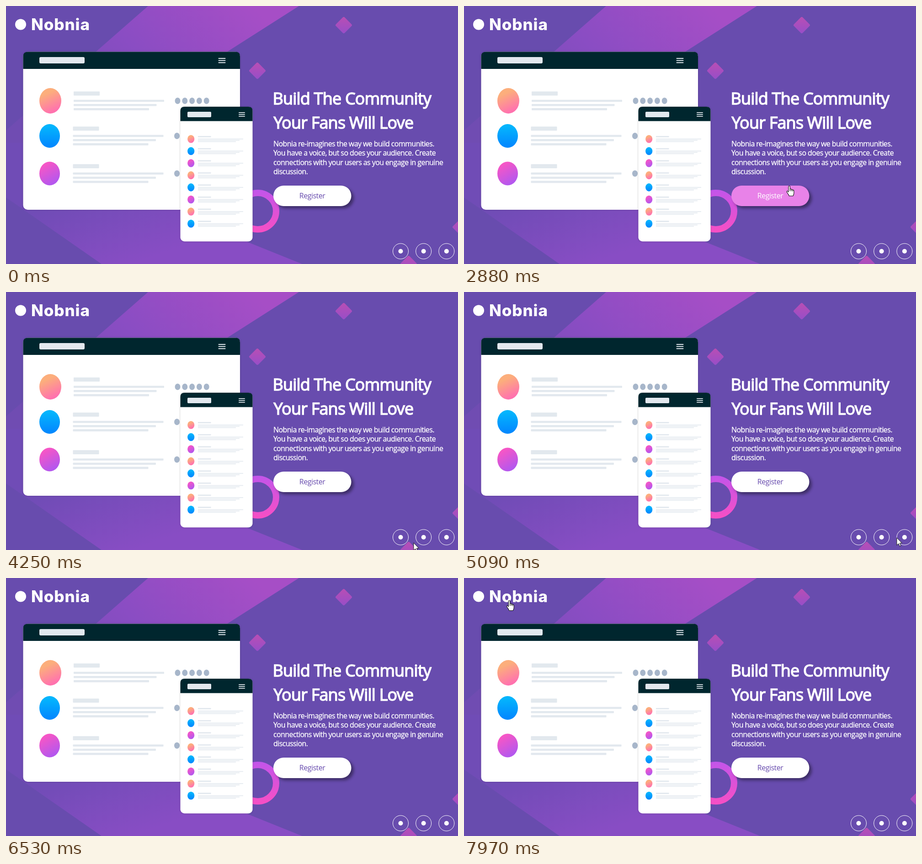
Animation, 989 px wide and 566 px high, one loop 8 s. Source, as an HTML page:

```html
<!DOCTYPE html>
<html lang="en">
<head>
<meta charset="utf-8">
<title>Landing page</title>
<style>
html, body { margin: 0; width: 100%; height: 100%; overflow: hidden; background: #684cae; }
svg { display: block; width: 100vw; height: 100vh; font-family: "Open Sans", sans-serif; }
</style>
</head>
<body>
<svg viewBox="0 0 989 566" preserveAspectRatio="none">
  <defs>
    <linearGradient id="bandTop" gradientUnits="userSpaceOnUse" x1="520" y1="-20" x2="170" y2="330">
      <stop offset="0" stop-color="#a64ec6"/><stop offset=".5" stop-color="#8a4dc3"/><stop offset="1" stop-color="#704cb2"/>
    </linearGradient>
    <linearGradient id="bandLow" gradientUnits="userSpaceOnUse" x1="150" y1="420" x2="210" y2="590">
      <stop offset="0" stop-color="#704cb6"/><stop offset="1" stop-color="#884dc4"/>
    </linearGradient>
    <linearGradient id="gem" x1="0" y1="0" x2="1" y2="1">
      <stop offset="0" stop-color="#b94eb4"/><stop offset="1" stop-color="#974ec8"/>
    </linearGradient>
    <linearGradient id="ring" gradientUnits="userSpaceOnUse" x1="0" y1="403" x2="0" y2="497">
      <stop offset="0" stop-color="#c255ea"/><stop offset="1" stop-color="#f84fc4"/>
    </linearGradient>
    <linearGradient id="warm" x1=".3" y1="0" x2=".7" y2="1">
      <stop offset=".2" stop-color="#fcae7c"/><stop offset=".9" stop-color="#ff72ae"/>
    </linearGradient>
    <linearGradient id="cool" x1="0" y1="0" x2="0" y2="1">
      <stop offset=".1" stop-color="#04b5fd"/><stop offset=".9" stop-color="#038afe"/>
    </linearGradient>
    <linearGradient id="pink" x1=".25" y1="0" x2=".75" y2="1">
      <stop offset=".1" stop-color="#f656c6"/><stop offset=".9" stop-color="#b457ee"/>
    </linearGradient>
    <filter id="blur" x="-20%" y="-40%" width="140%" height="180%"><feGaussianBlur stdDeviation="3"/></filter>
    <filter id="soft" x="-10%" y="-10%" width="120%" height="120%"><feGaussianBlur stdDeviation="2"/></filter>
  </defs>

  <rect width="989" height="566" fill="#684cae"/>
  <path d="M311 0H641L483 101L300 300H0V273Z" fill="url(#bandTop)"/>
  <path d="M0 300H300L529 518L648 566H209L0 420Z" fill="url(#bandLow)"/>
  <g id="gems" fill="url(#gem)"></g>
  <circle cx="551" cy="450" r="40" fill="none" stroke="url(#ring)" stroke-width="14"/>
  <g id="art"></g>

  <circle cx="32" cy="40.5" r="12" fill="#fff"/>
  <text x="55" y="53" font-family="Inter, sans-serif" font-size="35" font-weight="800" letter-spacing=".9" fill="#fff">Nobnia</text>

  <g fill="#fff" stroke="#fff" stroke-width="1.5" font-size="36" letter-spacing="-.82">
    <text x="583.5" y="216">Build The Community</text>
    <text x="585.5" y="268.5">Your Fans Will Love</text>
  </g>
  <g id="copy" fill="#fff" stroke="#fff" stroke-width=".3" font-size="16" letter-spacing="-.6"></g>

  <rect x="590" y="399" width="171" height="45" rx="22.5" opacity=".4" filter="url(#blur)"/>
  <rect id="button" x="585" y="394" width="170.5" height="45" rx="22.5"/>
  <text id="label" x="670" y="422" font-size="16" letter-spacing="-.5" text-anchor="middle">Register</text>

  <g id="social"></g>

  <g id="cursor" stroke="#111">
    <path id="arrow" d="M0 0V16.5L3.800 13L6.400 19L9 17.900L6.400 12H11.500Z" fill="#fff"/>
    <g id="hand" fill="#fff" stroke-width="1.1" stroke-linejoin="round">
      <path d="M-1.700 14V2Q-1.700 .5 0 .5T1.700 2V7.300Q4.300 6.300 4.700 8.400Q7 7.600 7.500 9.400Q10.200 9 10.200 11.600V16Q10.200 19 8.200 22.500H-.3Q-1 19.500-3 17.500L-5.400 13.800Q-6 12-4.400 11.400Q-3 11.300-1.700 14Z"/>
      <path d="M1.700 7V12M4.700 8.400V12M7.500 9.400V12.500" fill="none"/>
    </g>
    <path id="beam" d="M-3 -6.500H3M0 -6.500V6.500M-3 6.500H3" fill="none"/>
  </g>
</svg>
<script>
const $ = id => document.getElementById(id);
const add = (parent, tag, attrs, text) => {
  const el = document.createElementNS("http://www.w3.org/2000/svg", tag);
  for (const k in attrs) el.setAttribute(k, attrs[k]);
  if (text) el.textContent = text;
  return parent.appendChild(el);
};
const GREY = "#e2e8ee", DARK = "#00262e";
const TINTS = ["url(#warm)", "url(#cool)", "url(#pink)"];
const box = (x, y, width, height, fill, rx = 0) => add($("art"), "rect", { x, y, width, height, fill, rx });
const oval = (cx, cy, rx, ry, fill) => add($("art"), "ellipse", { cx, cy, rx, ry, fill });

function panel(x, y, w, h, head, r) {
  const shade = box(x, y, w, h, "#000", r);
  shade.setAttribute("opacity", ".2");
  shade.setAttribute("filter", "url(#soft)");
  box(x, y, w, h, "#fff", r);
  add($("art"), "path", {
    d: `M${x} ${y + head}v${r - head}q0 ${-r} ${r} ${-r}h${w - 2 * r}q${r} 0 ${r} ${r}v${head - r}z`, fill: DARK
  });
}

// three bars one under the other, each shorter than the last by `cut`
function bars(x, y, w, h, gap, cut, fill = GREY, rx = 0) {
  for (let i = 0; i < 3; i++) box(x, y + i * gap, w - i * cut, h, fill, rx);
}

function buildArt() {
  panel(37.5, 100.5, 474.5, 346.5, 37.5, 10);
  box(73, 112, 99, 14, GREY, 3);
  bars(464.5, 114, 16, 2, 4.6, 0, GREY, 1);
  [208, 285, 367.5].forEach((y, i) => {
    const shift = i ? -1.5 : 0;
    oval(97 + shift, y, 24 + shift, i ? 26 : 28, TINTS[i]);
    box(148 + shift, y - 20.5, 57, 9, GREY, 1);
    bars(148 + shift, y - 2.3, 198, 4.6, 9.2, 16.5, GREY, 1);
    for (let k = 0; k < 5; k++) oval(375.5 + shift + k * 15.8, y, 6, 7, "#a7b6ca");
  });

  panel(381.5, 221, 158, 295.5, 31.5, 9);
  box(397, 232, 52, 12, GREY, 2);
  bars(509, 233, 14, 1.8, 4, 0, GREY, 1);
  for (let i = 0; i < 8; i++) {
    const y = 291.7 + i * 26.55;
    oval(404.7, y, 7.6, 8.8, TINTS[i % 3]);
    box(420, y - 6.5, 28.5, 2.8, GREY);
    bars(420, y - .8, 99, 1.6, 2.9, 8);
  }
}

function buildPage() {
  [[739, 42], [550, 142], [881, 566], [995, 485]].forEach(([x, y]) =>
    add($("gems"), "rect", { x: -13.5, y: -13.5, width: 27, height: 27, rx: 3, transform: `translate(${x} ${y}) rotate(45)` }));
  ["Nobnia re-imagines the way we build communities.",
   "You have a voice, but so does your audience. Create",
   "connections with your users as you engage in genuine",
   "discussion."].forEach((s, i) => add($("copy"), "text", { x: 585, y: 308 + i * 20.25 }, s));
}

const links = [0, 1, 2].map(i => {
  const x = 863.5 + i * 50.2, g = add($("social"), "g", {});
  add(g, "circle", { cx: x, cy: 538, r: 17, fill: "none" });
  add(g, "circle", { cx: x, cy: 538, r: 5, stroke: "none" });
  return { x, g };
});

// each move: start and end time, ease (>0 slows down, <0 speeds up), bend point, end point
const START = [574, 556];
const MOVES = [
  [1190, 1940, 0, [622, 427], [645, 422]],
  [2420, 3160, -1, [713, 353], [852, 456]],
  [3230, 3970, 1, [860, 527], [876, 549]],
  [4040, 4530, 0, [895, 556], [912, 537]],
  [4670, 5440, 0, [953, 541], [961, 537]],
  [5510, 6270, 0, [900, 400], [779, 184]],
  [6400, 7150, 1, [695, 264], [541, 48]],
  [7220, 7700, 0, [320, -44], [63, 46]],
  [7900, 7970, 0, [81, 48], [99, 49]]
];

function pointer(t) {
  const i = MOVES.findLastIndex(m => m[0] <= t);
  const [from, to, ease, bend, end] = MOVES[i];
  const begin = i ? MOVES[i - 1][4] : START;
  const steps = Math.round((to - from) / 70);
  const k = Math.min(1, Math.floor((t - from) / (to - from) * steps + .25) / steps);
  const u = k + ease * k * (1 - k), v = 1 - u;
  return begin.map((b, j) => v * v * b + 2 * u * v * bend[j] + u * u * end[j]);
}

const show = (id, on) => $(id).setAttribute("visibility", on ? "visible" : "hidden");
const paint = (el, attr, color) => el.setAttribute(attr, color);

function draw(t) {
  const on = t >= MOVES[0][0];
  const [x, y] = on ? pointer(t) : [-99, -99];
  const within = (l, top, r, b) => x >= l && x <= r && y >= top && y <= b;

  const press = within(585, 394, 755, 439);
  paint($("button"), "fill", press ? "#e882e8" : "#fff");
  paint($("label"), "fill", press ? "#fff" : "#684cae");

  let hand = press && t >= 2270 || within(17, 26, 183, 55);
  for (const link of links) {
    const over = Math.hypot(x - link.x, y - 538) < 17;
    const color = over ? "#f0e2d8" : "#fff";
    paint(link.g, "fill", color);
    paint(link.g, "stroke", color);
    hand ||= over;
  }
  const text = within(585, 180, 930, 278) || within(585, 293, 955, 372);

  $("cursor").setAttribute("transform", `translate(${x.toFixed(1)} ${y.toFixed(1)})`);
  show("arrow", on && !hand && !text);
  show("hand", on && hand);
  show("beam", on && text);
}

buildArt();
buildPage();
const tick = () => {
  draw(performance.now() % 8000);
  requestAnimationFrame(tick);
};
tick();
</script>
</body>
</html>
```
